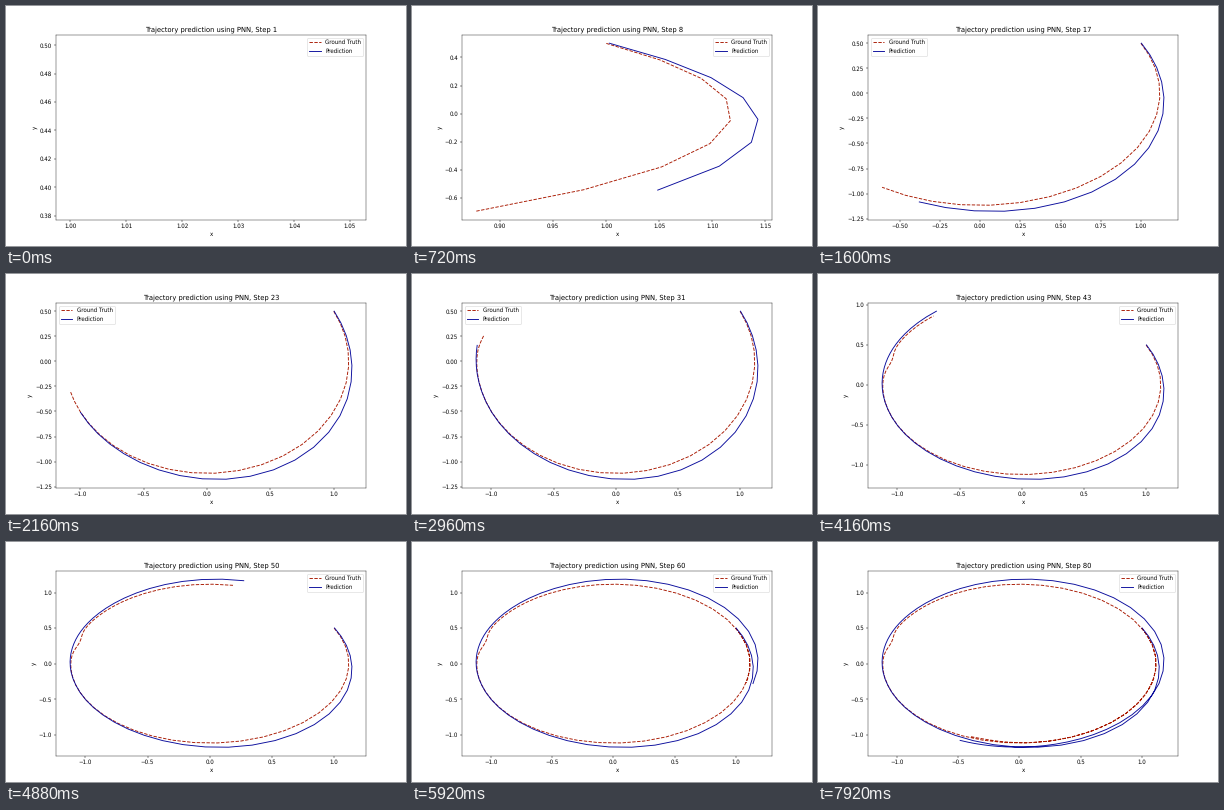
These frames come from a looping animation (400 by 240 pixels, 8000 ms). A matplotlib script:

```python
import numpy as np
import matplotlib.pyplot as plt
from matplotlib.animation import FuncAnimation

plt.rcParams.update({
    "text.hinting": "none",
    "axes.linewidth": 0.7,
    "axes.titlesize": 12.2,
    "lines.linewidth": 1.65,
})

FRAMES, INTERVAL = 100, 80
RED, BLUE = "#a81800", "#0a0c9c"
START = np.arctan2(0.5, 1.0)
RADIUS = np.hypot(1.0, 0.5)


def bump(t, center, width):
    return np.exp(-((t - center) / width) ** 2)


def sweep(t, mean, swing, peak, period):
    """Clockwise angle whose speed (degrees per step) rises and falls."""
    w = 2 * np.pi / period
    turned = mean * t + swing / w * (np.sin(w * (t - peak)) + np.sin(w * peak))
    return START - np.radians(turned)


def polar(r, a):
    return np.column_stack([r * np.cos(a), r * np.sin(a)])


t = np.arange(81)
truth = polar(RADIUS - 0.03 * bump(t, 32, 3) - 0.018 * bump(t, 78, 6),
              sweep(t, mean=5.97, swing=3.8, peak=10.7, period=45))

# The prediction bulges outward on each lap and slowly drifts off
drift = 0.0012 * np.maximum(t - 24, 0)
bulge = 0.087 * bump(t, 10.2, 5.6) + 0.055 * bump(t, 51, 7)
model = polar(RADIUS + drift + bulge,
              sweep(t, mean=6.18, swing=3.15, peak=10.7, period=43.5))

fig, ax = plt.subplots(figsize=(10, 6), dpi=40)


def draw(frame):
    # Four new steps in every five ticks
    step = 1 + frame - (frame + 2) // 5
    seen = truth[:step + 1]
    drawn = seen if step > 1 else seen[:1]
    ax.clear()
    ax.plot(*drawn.T, "--", color=RED, label="Ground Truth")
    ax.plot(*model[:step].T, "-", color=BLUE, label="Prediction")
    ax.update_datalim(seen)
    ax.autoscale_view()
    ax.set_title(f"Trajectory prediction using PNN, Step {step}")
    ax.set_xlabel("x")
    ax.set_ylabel("y")
    ax.legend(loc="best")
    return ax.lines


anim = FuncAnimation(fig, draw, frames=FRAMES, init_func=lambda: draw(0),
                     interval=INTERVAL, repeat=True, repeat_delay=0)
plt.show()
```
